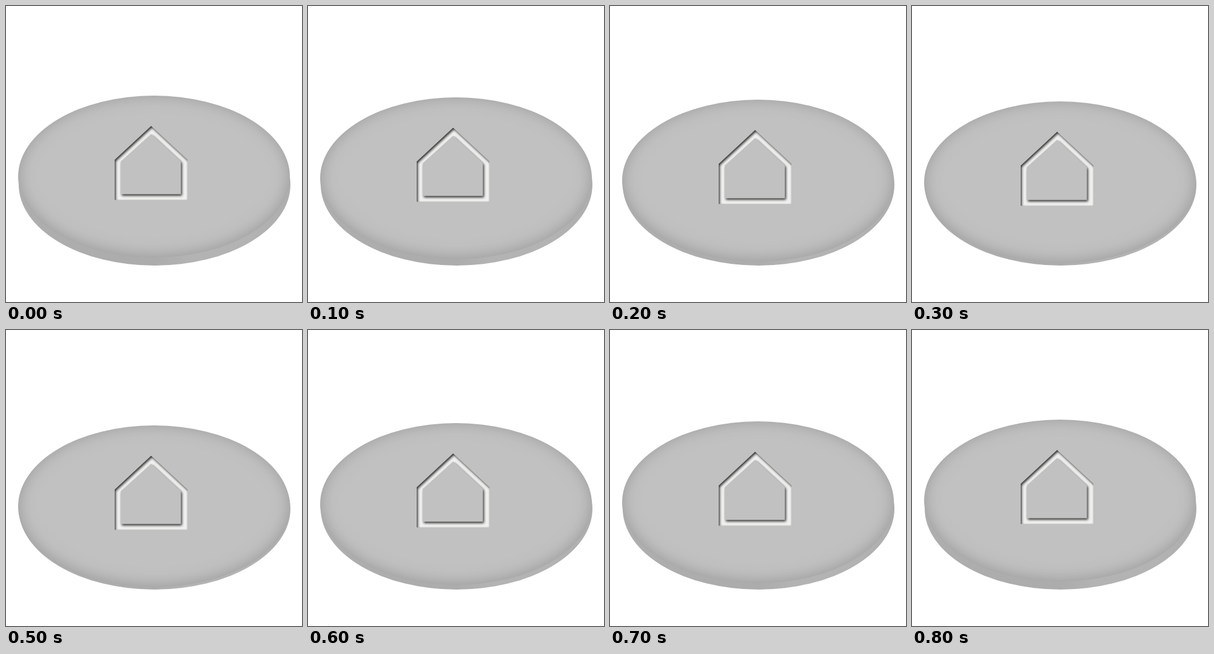
An HTML page with a canvas for the animation above (2 s loop, 512 by 512 pixels).

```html
<!DOCTYPE html>
<html lang="en">
<head>
<meta charset="utf-8">
<title>Home button</title>
<style>
  html, body { margin: 0; width: 100%; height: 100%; overflow: hidden; background: #fff; }
  canvas { display: block; width: 100%; height: 100%; }
</style>
</head>
<body>
<canvas id="stage" width="512" height="512"></canvas>
<script>
const ctx = document.getElementById('stage').getContext('2d');
const LOOP = 2000, STEP = 100, DEPTH = 13, FAR = 2000;

function polygon(points) {
  const path = new Path2D();
  points.forEach(([x, y]) => path.lineTo(x, y));
  path.closePath();
  return path;
}

function oval(cx, cy, rx, ry) {
  const path = new Path2D();
  path.ellipse(cx, cy, rx, ry, 0, 0, Math.PI * 2);
  return path;
}

const base = oval(257, 309, 235, 140);
const cap = oval(256, 295, 235, 140);
const house = polygon([[251, 207.5], [314, 266], [314, 335.5], [188, 335.5], [188, 266]]);
house.addPath(polygon([[251, 221.5], [302.5, 269], [302.5, 325.5], [198.5, 325.5], [198.5, 269]]));

const side = ctx.createLinearGradient(22, 0, 492, 0);
[[0, '#aeaeae'], [0.5, '#acacac'], [0.62, '#b3b3b3'], [0.85, '#b3b3b3'], [1, '#adadad']]
  .forEach(([at, color]) => side.addColorStop(at, color));

// Fills a shape and darkens it from its edges inward.
// Only the shadow of the distant surround reaches the stage.
function inset(shape, fill, shade, blur, dx, dy, lift) {
  ctx.fillStyle = fill;
  ctx.fill(shape, 'evenodd');
  ctx.save();
  ctx.clip(shape, 'evenodd');
  const around = new Path2D();
  around.rect(-200, -200, 912, 912);
  around.addPath(shape);
  ctx.translate(-FAR, 0);
  ctx.shadowColor = shade;
  ctx.shadowBlur = blur;
  ctx.shadowOffsetX = FAR + dx;
  ctx.shadowOffsetY = dy;
  ctx.fillStyle = '#000';
  ctx.fill(around, 'evenodd');
  ctx.restore();
}

function press(ms) {
  const n = Math.min(8, Math.floor(ms / STEP));
  const part = k => Math.round(k * DEPTH / 4);
  return n <= 4 ? part(n) : DEPTH - part(n - 4);
}

function draw(offset) {
  ctx.fillStyle = '#fff';
  ctx.fillRect(0, 0, 512, 512);
  ctx.fillStyle = side;
  ctx.fill(base);
  ctx.save();
  ctx.translate(0, offset);
  inset(cap, '#c1c1c1', 'rgba(0,0,0,.21)', 27, 0, -2);
  inset(house, '#f1f1f0', 'rgba(0,0,0,.82)', 4.5, 1.8, 2.4);
  ctx.restore();
}

let shown = -1;
function tick() {
  const offset = press(performance.now() % LOOP);
  if (offset !== shown) draw(shown = offset);
  requestAnimationFrame(tick);
}
tick();
</script>
</body>
</html>
```
